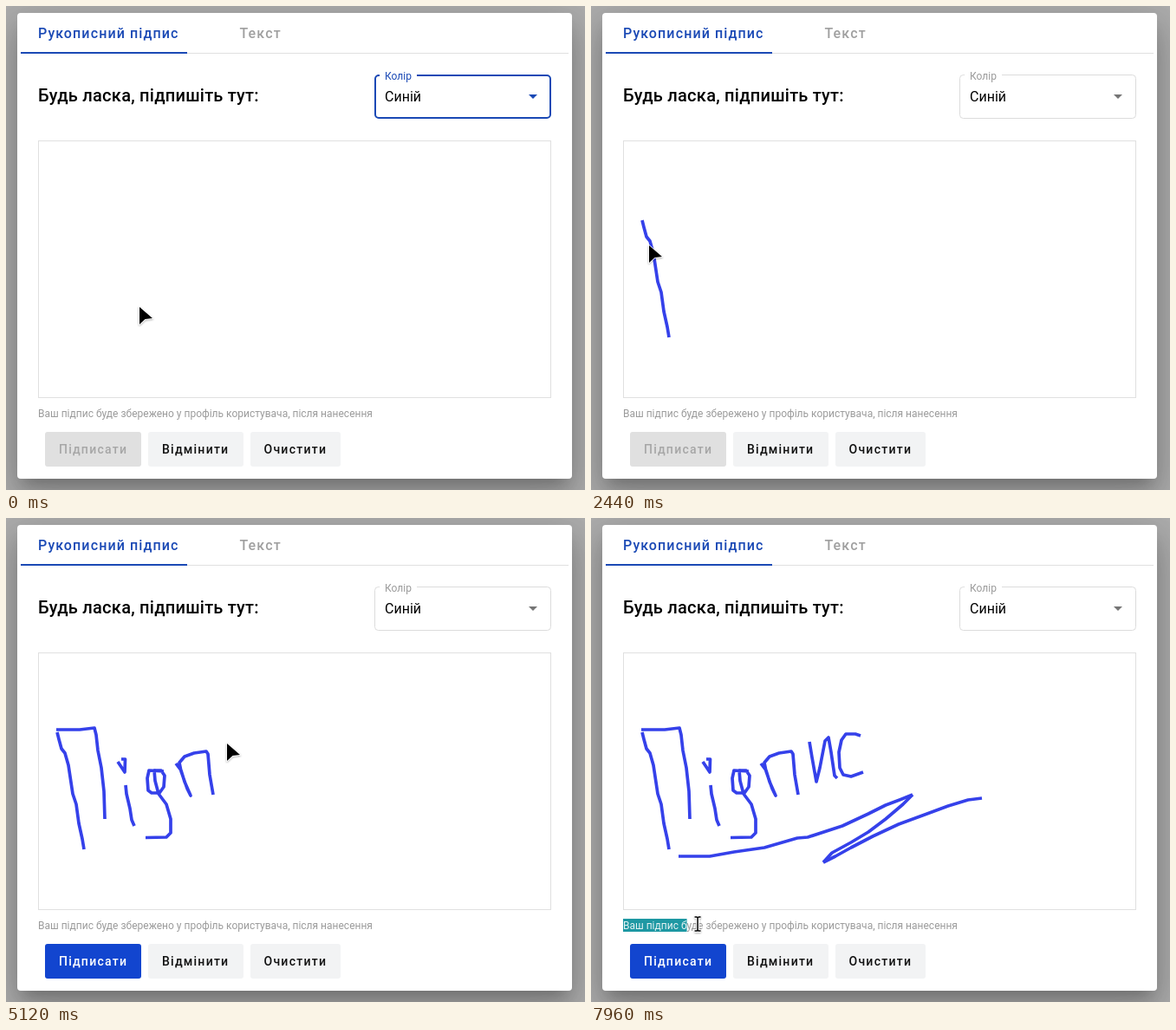
These frames come from a looping animation (668 px wide and 558 px high, 8 s). An HTML page:

```html
<!DOCTYPE html>
<html lang="uk">
<head>
<meta charset="utf-8">
<title>Рукописний підпис</title>
<style>
  html, body { margin: 0; width: 100%; height: 100%; overflow: hidden; background: #adadad; }
  .dialog {
    position: absolute; left: 13px; top: 8px; width: 640px; height: 537px;
    border-radius: 4px; background: #fff;
    box-shadow: 0 11px 15px -7px rgba(0,0,0,.2), 0 24px 38px 3px rgba(0,0,0,.14), 0 9px 46px 8px rgba(0,0,0,.12);
  }
  svg { position: absolute; left: 0; top: 0; font-family: Roboto, sans-serif; }
  .tab { font-size: 16px; font-weight: 500; letter-spacing: 1.1px; }
  .heading { font-size: 20px; font-weight: 500; letter-spacing: .25px; }
  .button { font-size: 14px; font-weight: 500; letter-spacing: 1.25px; }
  .value { font-size: 16px; }
  .small { font-size: 12px; }
  .ink path { fill: none; stroke: #3541ea; stroke-width: 3.7; stroke-linejoin: round; }

  .select .frame { fill: none; stroke: #dcdcdc; stroke-width: 1; }
  .select .label { fill: #9a9a9a; }
  .select .arrow { fill: #757575; }
  .select.focused .frame { stroke: #1a49b5; stroke-width: 2; }
  .select.focused .label, .select.focused .arrow { fill: #1a49b5; }

  .sign rect { fill: #e0e0e0; }
  .sign text { fill: #a6a6a6; }
  .sign.enabled rect { fill: #1245cf; }
  .sign.enabled text { fill: #fff; }
</style>
</head>
<body>
<div class="dialog"></div>
<svg width="668" height="558" viewBox="0 0 668 558">
  <defs>
    <clipPath id="selected"><rect id="selectedArea" x="37" y="462" width="0" height="15"/></clipPath>
    <filter id="soft" x="-50%" y="-50%" width="200%" height="200%">
      <feDropShadow dx="0" dy="1" stdDeviation="1" flood-opacity=".35"/>
    </filter>
  </defs>

  <path d="M17 54.5H649" stroke="#e0e0e0"/>
  <path d="M17 54H209" stroke="#1a49b5" stroke-width="2"/>
  <text class="tab" x="37" y="37" fill="#1a49b5">Рукописний підпис</text>
  <text class="tab" x="269.5" y="37" fill="#a0a0a0">Текст</text>
  <text class="heading" x="37" y="110">Будь ласка, підпишіть тут:</text>

  <g class="select" id="select">
    <rect class="frame" id="frame" x="425.5" y="79.5" width="203" height="50" rx="4"/>
    <path d="M431 80H474" stroke="#fff" stroke-width="4"/>
    <text class="label small" x="437" y="85">Колір</text>
    <text class="value" x="437" y="110">Синій</text>
    <path class="arrow" d="M603 102H613L608 107Z"/>
  </g>

  <rect x="37.5" y="155.5" width="591" height="296" fill="#fff" stroke="#e0e0e0"/>
  <g class="ink" id="ink"></g>

  <text class="small" x="37" y="474" fill="#9b9b9b">Ваш підпис буде збережено у профіль користувача, після нанесення</text>
  <g clip-path="url(#selected)">
    <rect x="37" y="462" width="386" height="15" fill="#1e98a3"/>
    <text class="small" x="37" y="474" fill="#e6f3f4">Ваш підпис буде збережено у профіль користувача, після нанесення</text>
  </g>

  <g class="sign" id="sign">
    <rect x="45" y="491" width="111" height="40" rx="3"/>
    <text class="button" x="61" y="516">Підписати</text>
  </g>
  <rect x="164" y="491" width="110" height="40" rx="3" fill="#f2f3f4"/>
  <text class="button" x="180" y="516" fill="#111">Відмінити</text>
  <rect x="282" y="491" width="104" height="40" rx="3" fill="#f2f3f4"/>
  <text class="button" x="297.5" y="516" fill="#111">Очистити</text>

  <g id="cursor" stroke="#fff" stroke-linejoin="round" filter="url(#soft)">
    <path id="arrow" d="M0 0L15 13L6.500 14L0 20Z" stroke-width="1.500" paint-order="stroke"/>
    <path id="hand" d="M-4 1C-5 -1 -2 -2.500 -1 -.5L2 5C3.500 3.500 5 4 5.500 5C7 4 8 5 8.500 6C10 5.500 11 7 11 9L11.500 14L12 17L4 20L2 17L-4 13C-6 11 -4 9.500 -2 10.500L0 11Z" stroke-width="1.500" paint-order="stroke"/>
    <g id="beam" fill="none">
      <path d="M-3.500 -8H-1L0 -7L1 -8H3.500M0 -7V7M-3.500 8H-1L0 7L1 8H3.500" stroke-width="3.500"/>
      <path d="M-3.500 -8H-1L0 -7L1 -8H3.500M0 -7V7M-3.500 8H-1L0 7L1 8H3.500" stroke="#000" stroke-width="1.500"/>
    </g>
  </g>
</svg>
<script>
  const LOOP = 8000;
  const INK_LAG = 35;
  const BLUR_AT = 2040;
  const ENABLE_AT = 2640;
  const DRAG_AT = 7720;
  const el = id => document.getElementById(id);

  // Pen strokes: start, end, outline.
  const strokes = [
    [2020, 2240, 'M59 247L61 255L64 266L68 271L72 285L77 318L81 330L84 352L88 370L90 382'],
    [2560, 2960, 'M58 244H85L102 242L104 250L106 268L110 288L113 315L114 347'],
    [3080, 3320, 'M138 308L139 318L143 335L145 348L148 355'],
    [3400, 3560, 'M129 281L137 293L137.500 278L133 278'],
    [3780, 4480, 'M182 292L165 291L163 300L164 314L168 317L177 317L182 310L183 297L179 291L171 291L172 303L176 318L185 330L190 347V363L185 368L161 368.500'],
    [4600, 5030, 'M196 283L202 291L206 304L213 320L209 312L202 292L200 282L206 275L217 271L231 269L233 272L235 296L239 319'],
    [5160, 5500, 'M252 258L255 276L260 304L264 288L270 257L274 253L277 270L281 297L284 300'],
    [5580, 5840, 'M311 251L305 249H294L289 256L286 270L287 288L291 296L300 298L314 293'],
    [5980, 6480, 'M101 390H137L165 385L200 380L238 369L250 368L290 355L320 341L340 331L356 325L371 319'],
    [6480, 6590, 'M371 319L360 330L340 347L320 362L300 374L278 386L268 397'],
    [6590, 6740, 'M268 397L282 390L300 380L325 367L355 353L385 342L412 332L435 325L451 323']
  ].map(([start, end, d]) => {
    const path = document.createElementNS('http://www.w3.org/2000/svg', 'path');
    path.setAttribute('d', d);
    el('ink').append(path);
    return { start, end, path, length: path.getTotalLength() };
  });

  const pointOn = (stroke, part) => stroke.path.getPointAtLength(stroke.length * part);

  // Places the pointer passes while the pen is up, joined with the stroke ends.
  const stops = [
    [0, 154, 347], [200, 154, 347], [820, 478, 104], [1560, 478, 104], [1680, 400, 150],
    [2440, 67, 276], [3680, 175, 313], [5120, 255, 260],
    [6980, 451, 323], [7380, 100, 505], [7560, 96, 500],
    [7700, 37, 468], [DRAG_AT, 37, 468], [LOOP, 137, 468]
  ].map(([t, x, y]) => ({ t, x, y }));
  for (const stroke of strokes) {
    for (const [t, part] of [[stroke.start, 0], [stroke.end, 1]]) {
      const { x, y } = pointOn(stroke, part);
      stops.push({ t, x, y });
    }
  }
  stops.sort((a, b) => a.t - b.t);

  const progress = (t, start, end) => Math.min(1, Math.max(0, (t - start) / (end - start)));

  function pointerAt(t) {
    const active = strokes.find(s => t >= s.start && t < s.end);
    if (active) return pointOn(active, progress(t, active.start, active.end));
    const next = stops.findIndex(s => s.t > t);
    const a = stops[next - 1], b = stops[next];
    const p = progress(t, a.t, b.t);
    const k = b.t === LOOP ? p : p * p * (3 - 2 * p);
    return { x: a.x + (b.x - a.x) * k, y: a.y + (b.y - a.y) * k };
  }

  const inside = ({ x, y }, left, top, right, bottom) =>
    x >= left && x <= right && y >= top && y <= bottom;

  function pointerKind(p) {
    if (inside(p, 425, 79, 629, 130) || inside(p, 45, 491, 386, 531)) return 'hand';
    return inside(p, 30, 460, 423, 478) ? 'beam' : 'arrow';
  }

  function draw(t) {
    for (const { start, end, path, length } of strokes) {
      const part = progress(t - INK_LAG, start, end);
      path.style.visibility = part > 0 ? 'visible' : 'hidden';
      path.style.strokeDasharray = part < 1 ? `${length * part} ${length + 9}` : 'none';
    }

    const focused = t < BLUR_AT;
    el('select').classList.toggle('focused', focused);
    const inset = focused ? 1 : .5;
    const box = { x: 425 + inset, y: 79 + inset, width: 204 - 2 * inset, height: 51 - 2 * inset };
    for (const name in box) el('frame').setAttribute(name, box[name]);
    el('sign').classList.toggle('enabled', t >= ENABLE_AT);

    const selected = t > DRAG_AT + INK_LAG ? pointerAt(t - INK_LAG).x - 37 : 0;
    el('selectedArea').setAttribute('width', selected);

    const point = pointerAt(t);
    const kind = pointerKind(point);
    el('cursor').setAttribute('transform', `translate(${point.x} ${point.y})`);
    for (const name of ['arrow', 'hand', 'beam']) {
      el(name).style.display = name === kind ? '' : 'none';
    }
  }

  const began = performance.now();
  function tick() {
    draw((performance.now() - began) % LOOP);
    requestAnimationFrame(tick);
  }
  tick();
</script>
</body>
</html>
```
